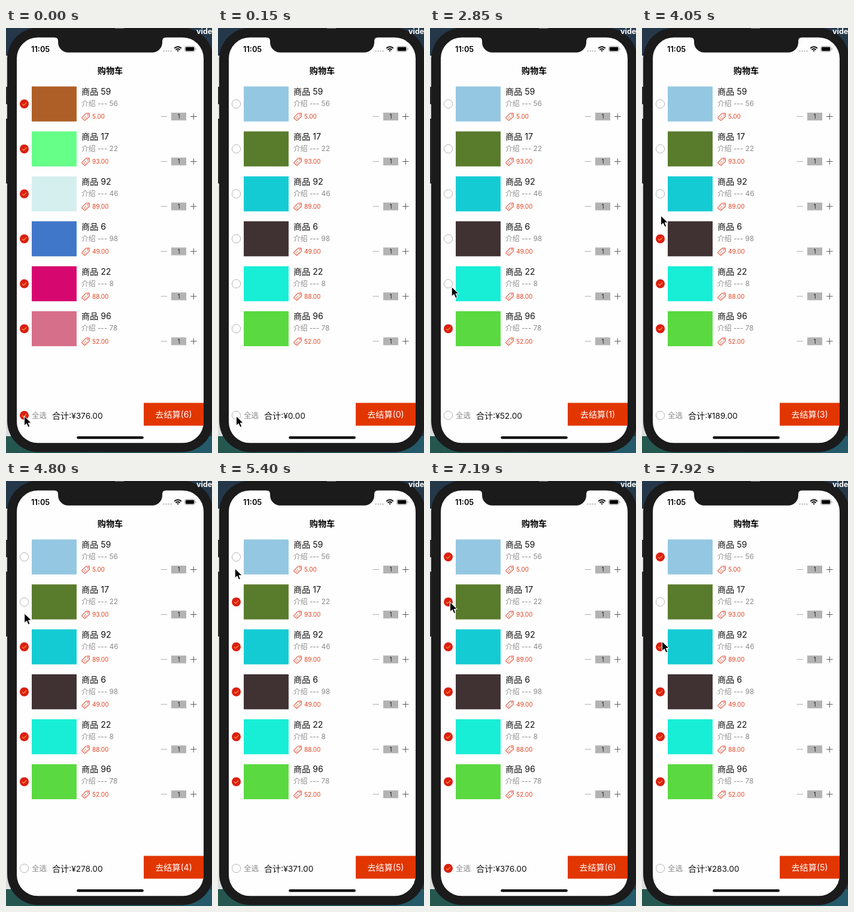
An HTML page that plays this animation: 344 by 708 pixels, repeating every 8 s.

```html
<!DOCTYPE html>
<html lang="zh-CN">
<head>
<meta charset="utf-8">
<title>购物车</title>
<style>
  html, body { margin: 0; width: 100%; height: 100%; overflow: hidden; background: #24384a; }
  svg { display: block; width: 100%; height: 100%; }
  text { font-family: Inter, "Noto Sans CJK SC", "Noto Sans CJK", sans-serif; font-size: 14.1px; white-space: pre; }
  .mid { text-anchor: middle; }
  .note { font-size: 11.8px; fill: #8a8a8a; }
  .small { font-size: 10px; }
</style>
</head>
<body>
<svg viewBox="0 0 344 708">
  <defs>
    <linearGradient id="sea" x2="1">
      <stop offset="0" stop-color="#25574f"/>
      <stop offset="1" stop-color="#245a6a"/>
    </linearGradient>
    <g id="tag" fill="none" stroke="#e4553c" stroke-linejoin="round">
      <path d="M126.8 149.2L133.6 142.2L139 141.8L139.5 147L132.2 153.8Q131.4 154.2 130.8 153.6L126.8 150.2Q126.4 149.7 126.8 149.2Z" stroke-width="1.1"/>
      <circle cx="136.6" cy="144.6" r="1.1" stroke-width=".8"/>
      <path d="M130 149.2l2.6 2.3M132 147l2.6 2.3"/>
    </g>
    <g id="stepper">
      <path d="M258.500 147.500h10.500" stroke="#aaa"/>
      <rect x="276" y="141" width="25" height="13" fill="#b3b3b3"/>
      <text class="mid small" x="288.500" y="151.200" fill="#222">1</text>
      <path d="M308 147.500h10.500M313.200 142.300v10.400" stroke="#555"/>
    </g>
    <g id="on">
      <circle r="7.5" fill="#dc1f10"/>
      <path d="M-3.6 .2L-1 2.600L3.800 -2.200" fill="none" stroke="#f5a04c" stroke-width="1.1"/>
    </g>
    <circle id="off" r="7.1" fill="#fff" stroke="#aaa" stroke-width=".9"/>
  </defs>

  <rect width="344" height="708" fill="#24384a"/>
  <rect y="46" width="8" height="634" fill="#d9dbdc"/>
  <path d="M0 98h8v29h-8zM0 151h8v108h-8z" fill="#2c2d2f"/>
  <rect y="680" width="344" height="28" fill="url(#sea)"/>
  <rect x="2" y="-.5" width="344" height="707" rx="52" fill="#1b1b1c"/>
  <rect x="182" width="15" height="1" fill="#777"/>
  <text x="318" y="9.500" style="font-size:12.500px" font-weight="700" fill="#fff">vide</text>

  <rect x="18" y="15.700" width="312" height="675.600" rx="35" fill="#fefefe"/>
  <path d="M81 15V15.700Q87 15.700 87 21.700V24A16.700 16.700 0 0 0 103.700 40.700H244.300A16.700 16.700 0 0 0 261 24V21.700Q261 15.700 267 15.700V15Z" fill="#1b1b1c"/>
  <text x="42" y="39.500" style="font-size:12.800px" font-weight="600">11:05</text>
  <path d="M263.500 38.500h14" stroke="#bbb" stroke-width="2.400" stroke-linecap="round" stroke-dasharray="0 4"/>
  <g fill="none" stroke="#000" stroke-width="1.900">
    <path d="M281.200 33.800Q287 28.500 292.800 33.800M283.400 36.300Q287 33 290.600 36.300"/>
    <path d="M285.300 37.600L287 39.800L288.700 37.600Q287 36.300 285.300 37.600Z" fill="#000" stroke="none"/>
    <rect x="298.500" y="30.500" width="17" height="9" rx="2.500" stroke="#999" stroke-width=".8"/>
    <rect x="299.800" y="31.800" width="14.400" height="6.400" rx="1.400" fill="#000" stroke="none"/>
    <path d="M317.200 33.500v3" stroke="#999" stroke-width="1"/>
  </g>
  <text class="mid" x="174" y="76" font-weight="600">购物车</text>

  <g id="rows"></g>

  <use id="all" x="30.500" y="645.300"/>
  <text x="43" y="650" style="font-size:12.500px" fill="#8a8a8a">全选</text>
  <text x="77" y="650.500" fill="#111">合计<tspan id="total" font-size="13.700"></tspan></text>
  <rect x="230" y="624.500" width="100" height="38" fill="#e23600"/>
  <text id="pay" class="mid" x="280" y="649" fill="#fff"></text>
  <rect x="118.200" y="680.300" width="111.600" height="4.100" rx="2" fill="#000"/>
  <path id="cursor" d="M.5 .5V16.500L4.300 13L7 19.100L9.700 18L7.200 12H12.300Z" stroke="#fff"/>
</svg>
<script>
const LOOP = 8000, RESET = 150, CLICK_DELAY = 300;
const TOP = 126.5, PITCH = 74.88;
const $ = id => document.getElementById(id);

const items = [
  { no: 59, info: 56, price: 5,  before: '#ae5f27', after: '#94c8e2' },
  { no: 17, info: 22, price: 93, before: '#66ff88', after: '#597b2c' },
  { no: 92, info: 46, price: 89, before: '#d5efef', after: '#15cbd3' },
  { no: 6,  info: 98, price: 49, before: '#4177c9', after: '#403132' },
  { no: 22, info: 8,  price: 88, before: '#d6086f', after: '#18eed6' },
  { no: 96, info: 78, price: 52, before: '#d66f8a', after: '#5ad940' }
];

// the pointer glides to a row, then clicks it
const visits = [
  { row: 5, go: 1050, arrive: 1950, x: 31 },
  { row: 4, go: 2400, arrive: 3000, x: 36 },
  { row: 3, go: 3300, arrive: 3450, x: 31 },
  { row: 2, go: 3873, arrive: 4450, x: 31 },
  { row: 1, go: 4700, arrive: 4900, x: 30 },
  { row: 0, go: 5200, arrive: 5600, x: 27 },
  { row: 1, go: 6850, arrive: 7180, x: 33 },
  { row: 2, go: 7480, arrive: 8166, x: 33 }
];

$('rows').innerHTML = items.map((it, i) => `
  <g transform="translate(0 ${i * PITCH})">
    <use class="tick" x="30.5" y="${TOP}"/>
    <rect class="pic" x="43" y="97.4" width="74.9" height="58.3"/>
    <text x="126" y="111" fill="#111">商品 ${it.no}</text>
    <text class="note" x="126" y="130">介绍 --- ${it.info}</text>
    <use href="#tag"/>
    <text class="small" x="144" y="151.2" fill="#e2401f">${it.price.toFixed(2)}</text>
    <use href="#stepper"/>
  </g>`).join('');
const ticks = document.querySelectorAll('.tick');
const pics = document.querySelectorAll('.pic');

// the screen refreshes in steps, slightly faster near the end
const hold = t => t < 6898
  ? Math.floor(t / 150) * 150
  : 6898 + Math.floor((t - 6898) / 146) * 146;

const easeOut = k => 1 - (1 - k) ** 2;
const setTick = (el, on) => el.setAttribute('href', on ? '#on' : '#off');

// an odd number of clicks leaves a row ticked
const isOn = (row, t) =>
  visits.filter(v => v.row === row && t >= v.arrive + CLICK_DELAY).length % 2 === 1;

function pointer(t) {
  let x = 30, y = 646;
  for (const v of visits) {
    const k = easeOut(Math.min(1, Math.max(0, (t - v.go) / (v.arrive - v.go))));
    x += (v.x - x) * k;
    y += (TOP + v.row * PITCH - y) * k;
  }
  return [x, y];
}

function draw(time) {
  const t = hold(time);
  const fresh = t < RESET;
  const chosen = items.filter((_, i) => fresh || isOn(i, t));
  const sum = chosen.reduce((s, it) => s + it.price, 0);
  items.forEach((it, i) => {
    setTick(ticks[i], chosen.includes(it));
    pics[i].setAttribute('fill', fresh ? it.before : it.after);
  });
  setTick($('all'), chosen.length === items.length);
  $('total').textContent = `:¥${sum.toFixed(2)}`;
  $('pay').textContent = `去结算(${chosen.length})`;
  $('cursor').setAttribute('transform', `translate(${pointer(t)})`);
}

const start = performance.now();
function tick() {
  draw((performance.now() - start) % LOOP);
  requestAnimationFrame(tick);
}
tick();
</script>
</body>
</html>
```
